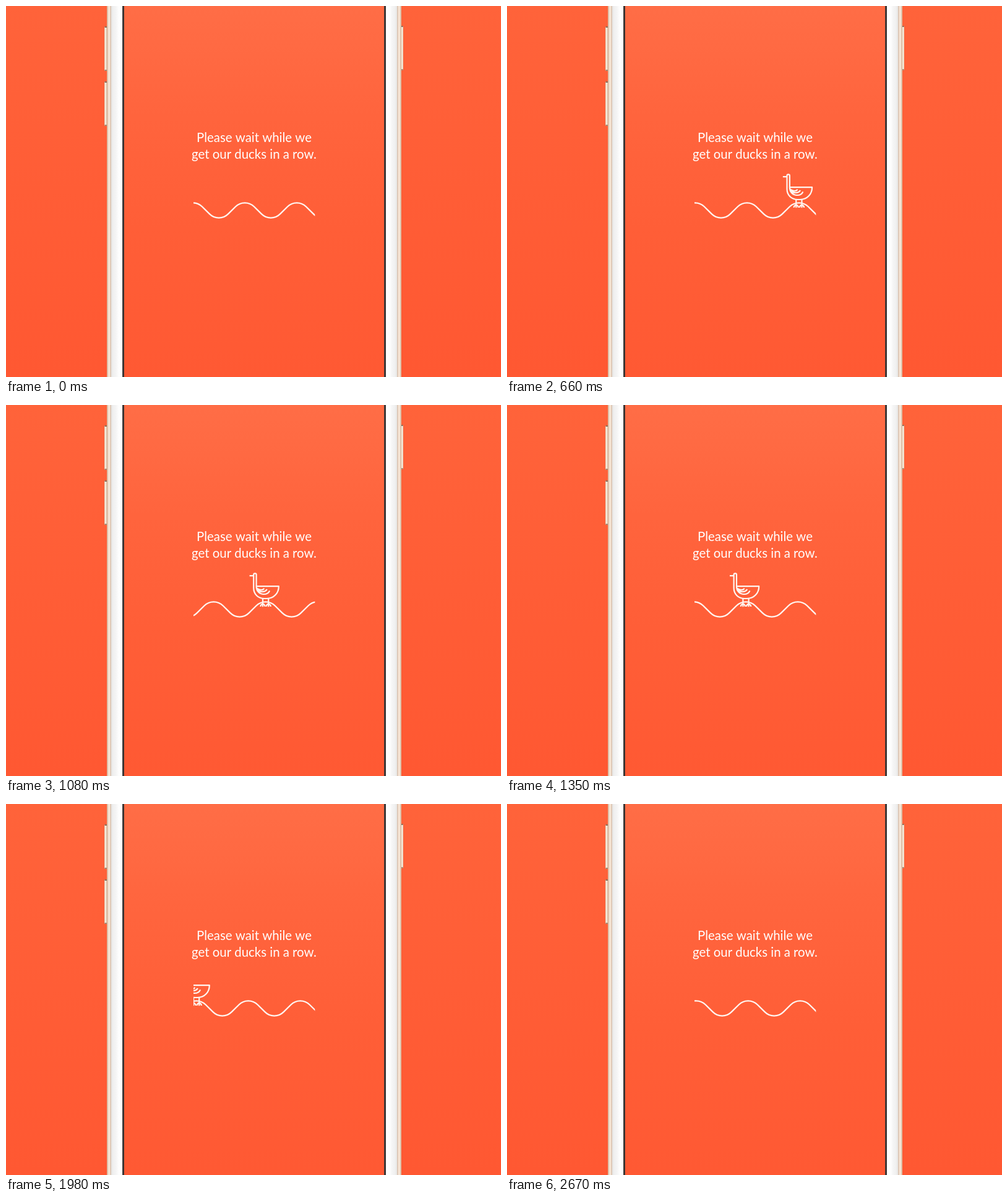
These frames come from a looping animation (800 px wide and 600 px high, 2700 ms). An HTML page with a canvas:

```html
<!DOCTYPE html>
<html lang="en">
<head>
<meta charset="utf-8">
<title>Ducks in a row</title>
<style>
  html, body { margin: 0; width: 100%; height: 100%; overflow: hidden; background: #ff5d36; }
  canvas { display: block; width: 800px; height: 600px; }
</style>
</head>
<body>
<canvas id="stage" width="800" height="600"></canvas>
<script>
const ctx = document.getElementById('stage').getContext('2d');
const LOOP = 2700, STEP = 30;
const PERIOD = 84, SPEED = 4 * PERIOD / LOOP;
const FIRST_CREST = 470, TOP = 318.3, RADIUS = 21.2;
const INK = '#fff6f1';

function gradient(x0, y0, x1, y1, stops) {
  const g = ctx.createLinearGradient(x0, y0, x1, y1);
  stops.forEach(([at, color]) => g.addColorStop(at, color));
  return g;
}

function rect(x, y, w, h, fill) {
  ctx.fillStyle = fill;
  ctx.fillRect(x, y, w, h);
}

function button(x, y, flip) {
  const colors = ['#d9bda3', '#f8ecdd', '#f3dfcb', '#a98670'];
  if (flip) colors.reverse();
  const side = gradient(x, 0, x + 4.5, 0, colors.map((c, i) => [i / 3, c]));
  ctx.fillStyle = side;
  ctx.beginPath();
  ctx.roundRect(x, y, 4.5, 72, flip ? [0, 2, 2, 0] : [2, 0, 0, 2]);
  ctx.fill();
  rect(x + 0.6, y, 3.4, 2, '#8d6a55');
  rect(x + 0.6, y + 70, 3.4, 2, '#a98770');
}

function drawBezel() {
  const gold = [[0, '#d9b69b'], [0.2, '#dfc3ac'], [0.4, '#f8e9da'], [0.7, '#f5e3d2'], [0.88, '#d3b8a4'], [1, '#e2d5ca']];
  const white = [[0, '#e6e5e3'], [0.18, '#f0f0f0'], [0.45, '#f5f5f5'], [0.65, '#fdfdfd'], [1, '#ffffff']];
  rect(163, 0, 7, 600, gradient(163, 0, 170, 0, gold));
  rect(170, 0, 18, 600, gradient(170, 0, 188, 0, white));
  rect(188, 0, 3, 600, '#3c3635');
  rect(611, 0, 3, 600, '#3c3635');
  rect(614, 0, 18, 600, gradient(632, 0, 614, 0, white));
  rect(632, 0, 7, 600, gradient(639, 0, 632, 0, gold));
}

function drawPhone() {
  rect(0, 0, 800, 600, gradient(0, 0, 0, 600, [[0, '#ff633a'], [0.5, '#ff5d36'], [1, '#ff5832']]));
  button(159, 33, false);
  button(159, 122, false);
  button(637.5, 32, true);
  drawBezel();
  rect(191, 0, 420, 600, gradient(0, 0, 0, 600, [[0, '#ff6d46'], [0.3, '#ff643d'], [0.6, '#ff5e37'], [1, '#ff5933']]));
}

function drawText() {
  ctx.fillStyle = '#fff';
  ctx.font = '20.4px Lato, sans-serif';
  ctx.textAlign = 'center';
  ctx.fillText('Please wait while we', 401, 220);
  ctx.fillText('get our ducks in a row.', 401, 247);
}

// Quarter-angle arcs joined by 45 degree straight lines.
function drawWave(crest) {
  const bottom = TOP + 24.3, half = PERIOD / 2, a = Math.PI / 4, up = -Math.PI / 2;
  ctx.beginPath();
  for (let x = crest - 3 * PERIOD; x < 600; x += PERIOD) {
    ctx.arc(x, TOP + RADIUS, RADIUS, up - a, up + a);
    ctx.arc(x + half, bottom - RADIUS, RADIUS, -up + a, -up - a, true);
  }
  ctx.stroke();
}

function drawDuck(x) {
  ctx.save();
  ctx.translate(x, 0);
  ctx.stroke(new Path2D(
    // beak, head, neck and body
    'M-26 276.2H-19.4 M-15 293.2V274.6A2.2 2.2 0 0 0 -19.4 274.6V296' +
    'C-19.4 306 -12 313 -2 313H2C13 313 21.2 304.5 21.2 293.2H-15' +
    // wing
    'M-15 293.2C-15 301 -10 306 -3 306C2 306 5 304 6.5 300.3' +
    'M-13 299.5C-7 303.5 0 302.5 2.2 298' +
    'M-14.3 296.5C-9 300 -4.5 299.5 -2.2 296.8'
  ));
  for (const leg of [-4.6, 4.6]) {
    ctx.stroke(new Path2D(
      `M${leg} 313V326.3 M${leg - 3.7} 326Q${leg - 3.3} 322.5 ${leg} 321.5Q${leg + 3.3} 322.5 ${leg + 3.7} 326`
    ));
  }
  ctx.restore();
}

function drawScene(time) {
  const shift = time * SPEED;
  ctx.save();
  ctx.beginPath();
  ctx.rect(303, 262, 196.3, 90);
  ctx.clip();
  ctx.strokeStyle = INK;
  ctx.lineWidth = 2.2;
  ctx.lineJoin = 'round';
  drawWave(FIRST_CREST - shift % PERIOD);
  drawDuck(FIRST_CREST + PERIOD - shift);
  ctx.restore();
}

function frame() {
  const time = Math.floor((performance.now() % LOOP) / STEP) * STEP;
  drawPhone();
  drawText();
  drawScene(time);
  requestAnimationFrame(frame);
}
frame();
</script>
</body>
</html>
```
